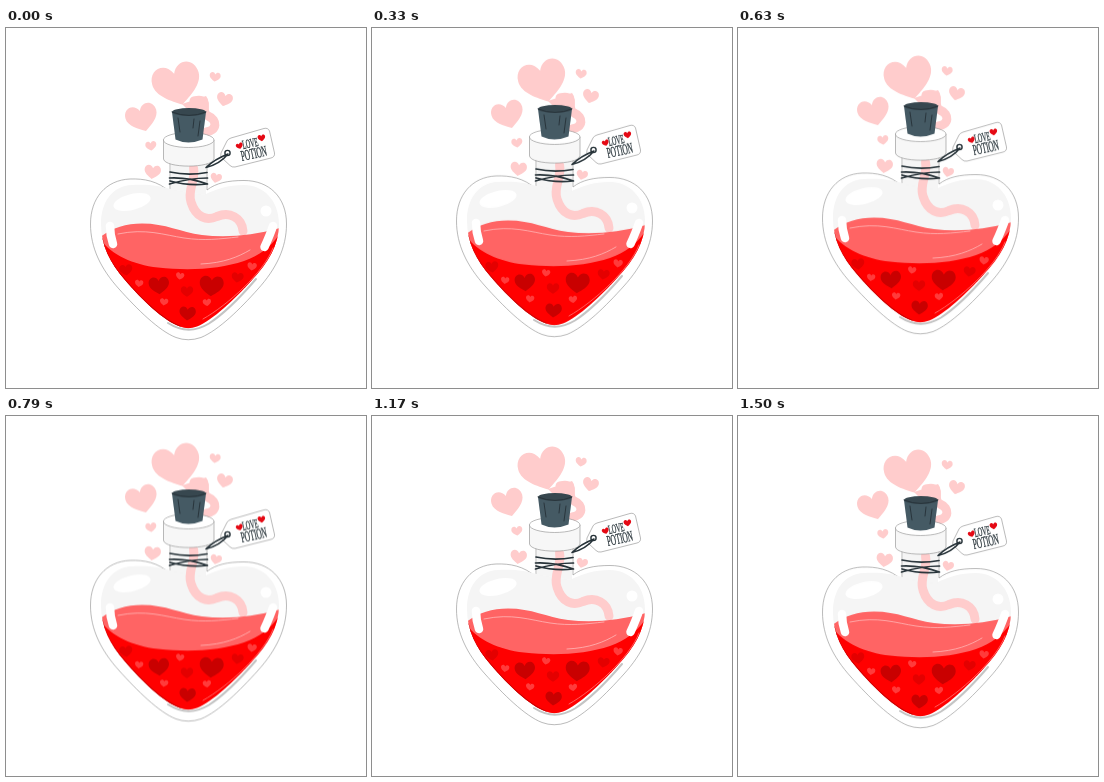
Recreate the animation shown at these times as an HTML page. Size 360 by 360 pixels, loop 1.54 s.

```html
<!DOCTYPE html>
<html lang="en">
<head>
<meta charset="utf-8">
<title>Love potion</title>
<style>
html, body { margin: 0; width: 100%; height: 100%; overflow: hidden; background: #fff; }
svg { display: block; width: 100vw; height: 100vh; }
.float { animation: float 1540ms linear infinite; }
@keyframes float {
  0%, 97.4%, 100% { transform: translateY(0); }
  48.7% { transform: translateY(-7px); }
}
.line { fill: none; stroke-linecap: round; stroke-linejoin: round; }
.rim { stroke: #8c8c8c; stroke-width: .6; }
.smoke { fill: #fcc; }
.trail { stroke: #fcc; }
.label { font-family: "Liberation Serif", "Noto Serif", serif; fill: #263238; stroke: #263238; stroke-width: .3; text-anchor: middle; }
</style>
</head>
<body>
<svg viewBox="0 0 360 360">
  <defs>
    <path id="heart" d="M0 8.500C-4 6-10 2.500-10-2.500C-10-9-2.500-10.500 0-4.500C2.500-10.500 10-9 10-2.500C10 2.500 4 6 0 8.500Z"/>
    <clipPath id="inside">
      <path d="M168 162C153 157 140 156 126 157C106 158 95 174 95 196C95 217 104 235 119 252C136 272 158 293 174 298.500Q182 302 191 298.500C207 292 228 272 246 252C262 235 273 217 273 196C273 172 257 157 238 157C222 157 210 161 198 167Z"/>
    </clipPath>
  </defs>

  <g class="float">
    <g class="smoke">
      <use href="#heart" transform="translate(171 56.500) rotate(-15) scale(2.4 2.450)"/>
      <use href="#heart" transform="translate(136 90) rotate(-17) scale(1.6)"/>
      <use href="#heart" transform="translate(209 49) rotate(8) scale(.55)"/>
      <use href="#heart" transform="translate(218.500 71.500) rotate(14) scale(.8)"/>
      <use href="#heart" transform="translate(145 118) rotate(-8) scale(.55)"/>
      <use href="#heart" transform="translate(146.500 144) rotate(8) scale(.82)"/>
      <use href="#heart" transform="translate(210 150) rotate(14) scale(.57)"/>
    </g>
    <path class="line trail" stroke-width="9" d="M188 73C206 69 193 84 202 88C212 92 211 103 200 104"/>
    <path class="smoke" d="M176 76L200 68Q205 74 201 84L184 84Z"/>

    <!-- bottle -->
    <path class="rim" fill="#fff" d="M164 134V164C152 153 138 150.500 124 151C100 152 84.500 170 84.500 196C84.500 220 95 241 113 261C131 281 153 303 170 309.500Q182 314 195 309.500C213 302 234 281 252 261C270 241 280.500 220 280.500 196C280.500 169 263 152.500 238 152.500C222 152.500 210 155 201 162V134Z"/>
    <path fill="#f5f5f5" d="M165 136H200V170H165Z"/>
    <g clip-path="url(#inside)">
      <path fill="#f5f5f5" d="M80 145H290V310H80Z"/>
    </g>
    <path class="line trail" stroke-width="9" d="M187.500 140C190 152 181 162 185 174C190 190 201 193 211 188.500C224 183 236 190 237 203"/>
    <g clip-path="url(#inside)">
      <path fill="#ff6464" d="M90 213C102 201 118 195.500 136 195.500C160 195.500 174 204 196 207C222 210.500 250 207 278 199V260H90Z"/>
      <path fill="#f00" d="M90 204C99 223 122 236 152 239.500C184 243 214 241 238 233C257 226 267 217 278 199V310H90Z"/>
      <path class="line" stroke="#ffb8b8" stroke-width=".8" d="M112 206C140 200 158 207 178 210S214 211 232 209M195 236C218 235 232 229 244 222"/>
      <path class="line" stroke="#c40000" stroke-width="1.500" d="M96 211C99 226 107 239 119 252C136 272 158 293 174 298.500"/>
      <path class="line" stroke="#ff7777" stroke-width=".8" d="M267 220C258 244 222 277 197 291"/>
      <g fill="#c90000">
        <use href="#heart" transform="translate(153 257.500) rotate(-4) scale(1.02)"/>
        <use href="#heart" transform="translate(205.500 258) rotate(4) scale(1.2)"/>
        <use href="#heart" transform="translate(181.500 285.500) rotate(4) scale(.82)"/>
      </g>
      <g fill="#e40000">
        <use href="#heart" transform="translate(181 263.500) scale(.62)"/>
        <use href="#heart" transform="translate(120 242) rotate(-8) scale(.65)"/>
        <use href="#heart" transform="translate(231.500 249.500) rotate(8) scale(.6)"/>
      </g>
      <g fill="#ff3b3b">
        <use href="#heart" transform="translate(174 248) rotate(10) scale(.42)"/>
        <use href="#heart" transform="translate(133 255.500) rotate(8) scale(.42)"/>
        <use href="#heart" transform="translate(246 238.500) rotate(8) scale(.47)"/>
        <use href="#heart" transform="translate(201 274.500) rotate(-6) scale(.42)"/>
        <use href="#heart" transform="translate(158 274) rotate(8) scale(.42)"/>
      </g>
    </g>
    <path class="line" stroke="#c4c4c4" stroke-width="2" d="M162 295C176 304 189 304 203 295.500C222 283 238 265 250 251"/>
    <g fill="#fff">
      <ellipse cx="126" cy="174" rx="19" ry="8" transform="rotate(-14 126 174)"/>
      <circle cx="260" cy="183" r="5.500"/>
    </g>
    <path class="line" stroke="#fff" stroke-width="8.500" d="M104 198Q104 207 107 216M267 198Q264 207 258.500 219"/>

    <!-- mouth and cork -->
    <path class="rim" fill="#f7f7f7" d="M157.500 112V131C159 140.500 206 140.500 208 131V112Z"/>
    <ellipse class="rim" fill="#fff" cx="182.700" cy="112" rx="25.300" ry="7.500"/>
    <path fill="#455a64" d="M166 84L169.500 111.500Q182 117.500 196.500 111.500L200 84Z"/>
    <ellipse fill="#37474f" cx="183" cy="84" rx="17" ry="4"/>
    <path class="line" stroke="#263238" stroke-width=".9" d="M166 84Q183 91 200 84M172 90L174 104M188 91L187 100M194 93L192 108"/>

    <!-- string -->
    <path class="line" stroke="#263238" stroke-width="1.700" d="M164 144Q182 148 201 144.500M163.500 150Q182 149 201.500 156M163.500 156Q184 150 201.500 150M164 153Q182 158 201 156"/>

    <!-- tag -->
    <path class="rim" fill="#fff" d="M215 125L221 113Q222 111 225 110L258 100.500Q262 99.500 263.500 103L268.500 125Q269 129 265 130L229 139Q226 139.500 224 137.500L216 130Q214 128 215 125Z"/>
    <circle cx="221.500" cy="125" r="2.600" fill="#fff" stroke="#263238" stroke-width="1.400"/>
    <path class="line" stroke="#263238" stroke-width="1.500" d="M200 139.500Q209 131 222 126M200 139.500Q214 136 222 126"/>
    <g fill="#e50914">
      <use href="#heart" transform="translate(233.500 118) rotate(-18) scale(.35)"/>
      <use href="#heart" transform="translate(255.500 110) rotate(-8) scale(.38)"/>
    </g>
    <g class="label" transform="translate(246.500 119.500) rotate(-12) scale(.48 1)">
      <text x="-3" y="-.5" font-size="12.500">LOVE</text>
      <text x="0" y="11" font-size="15">POTION</text>
    </g>
  </g>
</svg>
</body>
</html>
```
